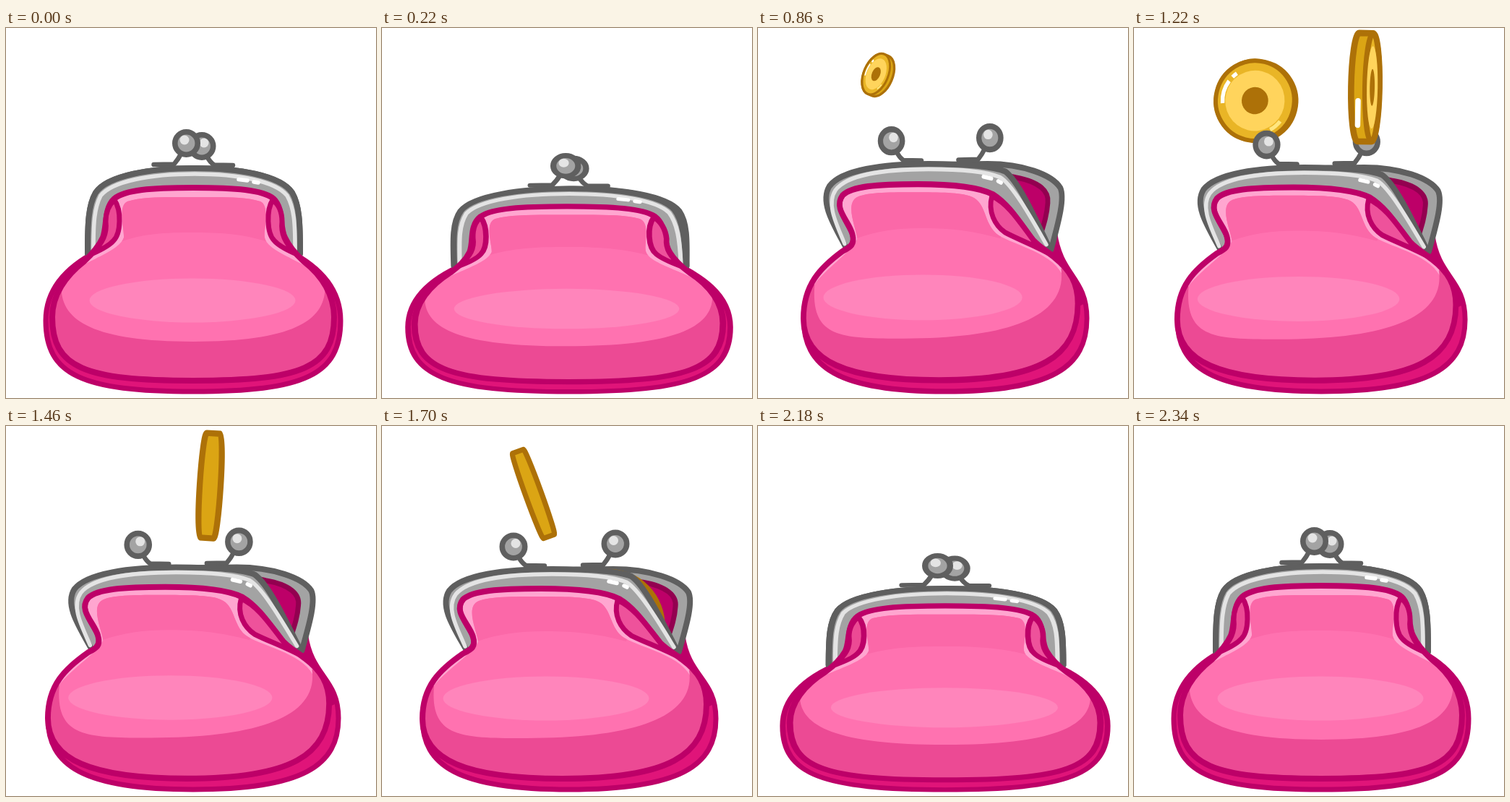
An HTML page with a canvas that plays this animation: 512x512 px, repeating every 3000 ms.

```html
<!DOCTYPE html>
<html lang="en">
<head>
<meta charset="utf-8">
<title>Coin purse</title>
<style>
  html, body { margin: 0; width: 100%; height: 100%; overflow: hidden; background: #fff; }
  canvas { display: block; width: 100vmin; height: 100vmin; }
</style>
</head>
<body>
<canvas id="stage" width="512" height="512"></canvas>
<script>
const ctx = document.getElementById('stage').getContext('2d');
const LOOP = 3000;
const RAD = Math.PI / 180;
const C = {
  steel: '#5f5f5f', grey: '#a3a3a3', shine: '#e4e4e4', white: '#fff',
  line: '#bd0068', deep: '#930050', rim: '#e01479', body: '#ff72b0',
  shade: '#ec4a94', panel: '#fb68a8', gloss: '#ff85bb', pale: '#ffa6d0', fold: '#ee529b',
  brown: '#ad7108', edge: '#dba514', ring: '#e9b526', gold: '#ffd45c', glow: '#ffe680'
};

// Purse: time, width scale, height scale, closedness
const POSE = [
  [0, 1, 1, 1], [167, 1.104, .9, 1], [500, .955, 1.046, 0], [860, .966, 1.032, 0],
  [1220, .981, 1.016, 0], [1700, 1, 1, 0], [2010, 1.015, .986, 0],
  [2167, 1.104, .9, 1], [2340, 1, 1, 1], [3000, 1, 1, 1]
];

// Coins: time, x, y, radius, flip, tilt
const COINS = [
  [[790, 152, 85, 3, -90, 30], [860, 166, 65, 29.5, -56, 23], [1080, 245, 77, 70, 25, 10],
   [1220, 320, 82, 75, 82, 1], [1400, 314, 270, 75, 150, 0], [1490, 312, 370, 75, 180, 0]],
  [[1150, 155, 108, 3, -60, 20], [1220, 168.5, 101, 55, -12, 14], [1400, 240, 84, 68, 60, 6],
   [1520, 310, 82, 75, 110, 2], [1700, 312, 276, 75, 170, 0], [1790, 312, 370, 75, 190, 0]],
  [[1530, 155, 108, 3, 10, 10], [1600, 172, 104, 45, 45, -8], [1700, 209, 94, 62.5, 87, -20],
   [1820, 300, 97, 73, 135, -8], [1950, 312, 290, 75, 180, 0], [2000, 312, 360, 75, 190, 0]]
];

// Monotone cubic through the rows
function track(rows, t) {
  let i = 0;
  while (i < rows.length - 2 && t >= rows[i + 1][0]) i++;
  const a = rows[i], b = rows[i + 1], d = b[0] - a[0];
  const u = Math.min(1, Math.max(0, (t - a[0]) / d));
  const secant = (k, j) => (rows[k + 1][j] - rows[k][j]) / (rows[k + 1][0] - rows[k][0]);
  const slope = (k, j) => {
    if (k === 0 || k === rows.length - 1) return 0;
    const p = secant(k - 1, j), q = secant(k, j);
    return p * q <= 0 ? 0 : 2 * p * q / (p + q);
  };
  return a.slice(1).map((v, n) => {
    const j = n + 1, w = 1 - u;
    return v * w * w * (1 + 2 * u) + b[j] * u * u * (3 - 2 * u)
      + d * u * w * (w * slope(i, j) - u * slope(i + 1, j));
  });
}

// Path between an open and a closed outline
function morph(open, closed) {
  const ends = closed.match(/-?[\d.]+/g).map(Number);
  return p => {
    let n = 0;
    return new Path2D(open.replace(/-?[\d.]+/g, v => +v + (ends[n++] - v) * p));
  };
}

const FRAME_SHUT = 'M113 312 C113 270 114 245 124 228 C140 204 200 194 261 194 C322 194 380 204 396 228 C406 245 407 270 407 312';
const SHAPE = {
  rim: morph(
    'M118 312 C100 325 58 352 56 405 C56 470 105 503 259 503 C413 503 462 470 462 405 C462 350 424 348 416 290 Z',
    'M128 308 C100 322 55 350 55 405 C55 480 105 503 259 503 C413 503 463 480 463 405 C463 350 418 322 390 308 Z'),
  neck: morph(
    'M402 300 L416 290 C422 350 452 350 459 385 L448 390 L430 345 Z',
    'M380 300 L390 308 C410 322 425 330 440 348 L436 350 L420 335 Z'),
  backFrame: morph(
    'M130 300 C130 260 160 210 200 204 C240 199 280 198 320 198 C370 198 412 212 424 230 C431 245 420 280 411 312',
    FRAME_SHUT),
  inside: morph(
    'M200 225 C240 215 330 208 360 216 C395 222 408 235 406 250 C405 265 401 277 396 292 Z',
    'M160 240 C200 235 320 235 350 240 C356 245 358 250 360 255 C362 270 365 285 370 300 Z'),
  frame: morph(
    'M118 312 C100 280 79 250 93 228 C110 206 170 198 235 198 C285 198 325 200 345 208 C365 222 390 275 409 312',
    FRAME_SHUT),
  shine: morph(
    'M115 305 C104 280 88 252 102 233 C118 213 170 205 235 205 C285 205 318 208 338 216 C356 226 385 275 404 306',
    'M121 308 C121 270 122 250 131 232 C147 212 200 202 261 202 C322 202 373 212 389 232 C399 250 400 270 400 308'),
  glints: morph('M314 215 L325 217.5 M335 221 L339 223', 'M322 209.5 L334 211 M343 213 L349 214'),
  body: morph(
    'M112 240 C125 228 160 225 220 225 C275 225 310 230 328 239 C350 252 365 275 385 300 C395 310 405 315 415 323 C438 340 449 358 449 385 C449 456 396 488 250 488 C116 488 56 462 56 405 C56 360 80 337 112 315 C124 309 130 306 126 292 C122 275 98 258 112 240 Z',
    'M150 236 C165 224 200 221 259 221 C318 221 355 224 370 236 C385 250 378 275 386 290 C392 303 400 312 412 323 C438 343 454 370 454 400 C454 470 410 488 259 488 C108 488 64 470 64 400 C64 370 82 343 108 323 C120 312 128 303 134 290 C140 275 135 250 150 236 Z'),
  face: morph(
    'M134 242 C150 236 180 236 220 236 C260 236 284 237 297 242 C318 250 314 276 332 291 C350 305 410 315 426 345 L460 500 L52 500 L70 362 C85 340 130 312 133 298 C132 285 114 250 134 242 Z',
    'M168 240 C190 233 220 234 259 234 C300 234 330 233 352 240 C366 246 356 280 358 290 C362 312 425 325 441 352 L460 500 L60 500 L76 352 C95 325 156 312 163 290 C164 280 154 246 168 240 Z'),
  panel: morph(
    'M80 200 L360 200 L338 298 C300 288 270 284 225 284 C190 284 160 288 132 298 Z',
    'M100 200 L400 200 L368 298 C330 284 290 283 259 283 C220 283 190 284 155 297 Z'),
  shade: morph(
    'M48 350 L72 360 C66 432 110 432 200 432 C345 432 435 405 425 338 L460 338 L460 500 L48 500 Z',
    'M56 340 L78 345 C68 400 110 434 259 434 C408 434 450 400 440 345 L462 340 L462 500 L56 500 Z'),
  foldRight: morph(
    'M326 241 C320 262 330 280 345 290 C365 300 390 308 415 322 C405 315 395 310 385 300 C365 275 350 252 326 241 Z',
    'M369 238 C360 252 361 284 371 294 C376 300 384 305 400 312 C386 296 380 285 382 268 C382 255 377 244 369 238 Z'),
  foldLeft: morph(
    'M112 241 C100 255 118 275 125 290 C129 298 127 306 118 312 C127 306 129 298 125 290 C118 275 100 255 112 241 Z',
    'M150 238 C160 252 159 284 149 294 C144 300 136 305 120 312 C134 296 140 285 138 268 C138 255 143 244 150 238 Z')
};

const lerp = (a, b, p) => a + (b - a) * p;

function paint(path, fill, stroke, width) {
  if (fill) { ctx.fillStyle = fill; ctx.fill(path); }
  if (stroke) { ctx.strokeStyle = stroke; ctx.lineWidth = width; ctx.stroke(path); }
}

function oval(x, y, rx, ry = rx, from = 0, to = 360) {
  const path = new Path2D();
  path.ellipse(x, y, rx, ry, 0, from * RAD, to * RAD);
  return path;
}

function scoped(draw) {
  ctx.save();
  draw();
  ctx.restore();
}

function inPurse(sx, sy, draw) {
  scoped(() => {
    ctx.translate(259, 506);
    ctx.scale(sx, sy);
    ctx.translate(-259, -506);
    draw();
  });
}

function knob(x, y, side) {
  scoped(() => {
    ctx.translate(x, y);
    const foot = side < 0 ? 'M-7 14 Q-11 22 -17 29 L-45 29.5' : 'M7 14 Q11 22 17 26 L43 26.5';
    paint(new Path2D(foot), null, C.steel, 6.5);
    paint(oval(0, 0, 15.7), C.grey, C.steel, 7.6);
    paint(oval(side < 0 ? -2.5 : 3, -4.5, 6.5), C.shine);
  });
}

const knobLeft = p => knob(lerp(182, 271, p), lerp(167, 163.5, p), 1);
const knobRight = p => knob(lerp(323, 249.5, p), lerp(163, 159.5, p), -1);

function coin(x, y, r, flip, tilt) {
  const c = Math.cos(flip * RAD), s = Math.sin(flip * RAD);
  const thin = Math.abs(c), rx = Math.max(.1, r * thin);
  const off = r * .13 * s * Math.sign(c), half = Math.abs(off);
  scoped(() => {
    ctx.translate(x, y);
    ctx.rotate(tilt * RAD);
    const hull = new Path2D();
    hull.ellipse(half, 0, rx, r, 0, -Math.PI / 2, Math.PI / 2);
    hull.ellipse(-half, 0, rx, r, 0, Math.PI / 2, Math.PI * 1.5);
    hull.closePath();
    paint(hull, C.edge, C.brown, r * .115);
    if (thin < .08) return;
    paint(oval(off, 0, rx, r), C.ring, C.brown, r * .1);
    const steep = thin < .3;
    if (steep) paint(new Path2D(`M${-off} ${r * .25}V${r * .7}`), null, C.white, r * .1);
    ctx.translate(off, 0);
    ctx.scale(thin, 1);
    paint(oval(0, 0, r * .76), C.gold);
    paint(oval(0, 0, r * .34), C.brown);
    if (steep) return;
    ctx.lineCap = 'butt';
    const glint = (from, to, color) =>
      paint(oval(0, 0, r * .83, r * .83, from, to), null, color, r * .1);
    glint(162, 203, C.white);
    glint(212, 222, C.white);
    glint(25, 48, C.glow);
  });
}

function back(p) {
  paint(SHAPE.rim(p), C.rim, C.line, 7);
  paint(SHAPE.neck(p), C.line);
  paint(SHAPE.backFrame(p), C.grey, C.steel, 8);
  paint(SHAPE.inside(p), C.line, C.deep, 7);
  if (p === 0) knobRight(p);
}

function front(p) {
  const body = SHAPE.body(p), face = SHAPE.face(p);
  knobLeft(p);
  if (p > 0) knobRight(p);
  paint(SHAPE.frame(p), C.grey, C.steel, 8);
  paint(SHAPE.shine(p), null, C.shine, 5.5);
  paint(SHAPE.glints(p), null, C.white, 5.5);
  scoped(() => {
    ctx.clip(body);
    paint(body, C.pale);
    paint(face, C.body);
    scoped(() => {
      ctx.clip(face);
      paint(SHAPE.panel(p), C.panel);
    });
    paint(SHAPE.shade(p), C.shade);
    paint(oval(lerp(227, 258, p), 377, 142.5, 30.5), C.gloss);
  });
  paint(body, null, C.line, 8);
  paint(SHAPE.foldLeft(p), C.shade, C.line, 7);
  paint(SHAPE.foldRight(p), C.fold, C.line, 7);
}

function render(t) {
  const [sx, sy, p] = track(POSE, t);
  ctx.fillStyle = C.white;
  ctx.fillRect(0, 0, 512, 512);
  ctx.lineJoin = ctx.lineCap = 'round';
  inPurse(sx, sy, () => back(p));
  for (const rows of COINS) {
    if (t >= rows[0][0] && t < rows[rows.length - 1][0]) coin(...track(rows, t));
  }
  inPurse(sx, sy, () => front(p));
}

const start = performance.now();
function tick() {
  render((performance.now() - start) % LOOP);
  requestAnimationFrame(tick);
}
tick();
</script>
</body>
</html>
```
